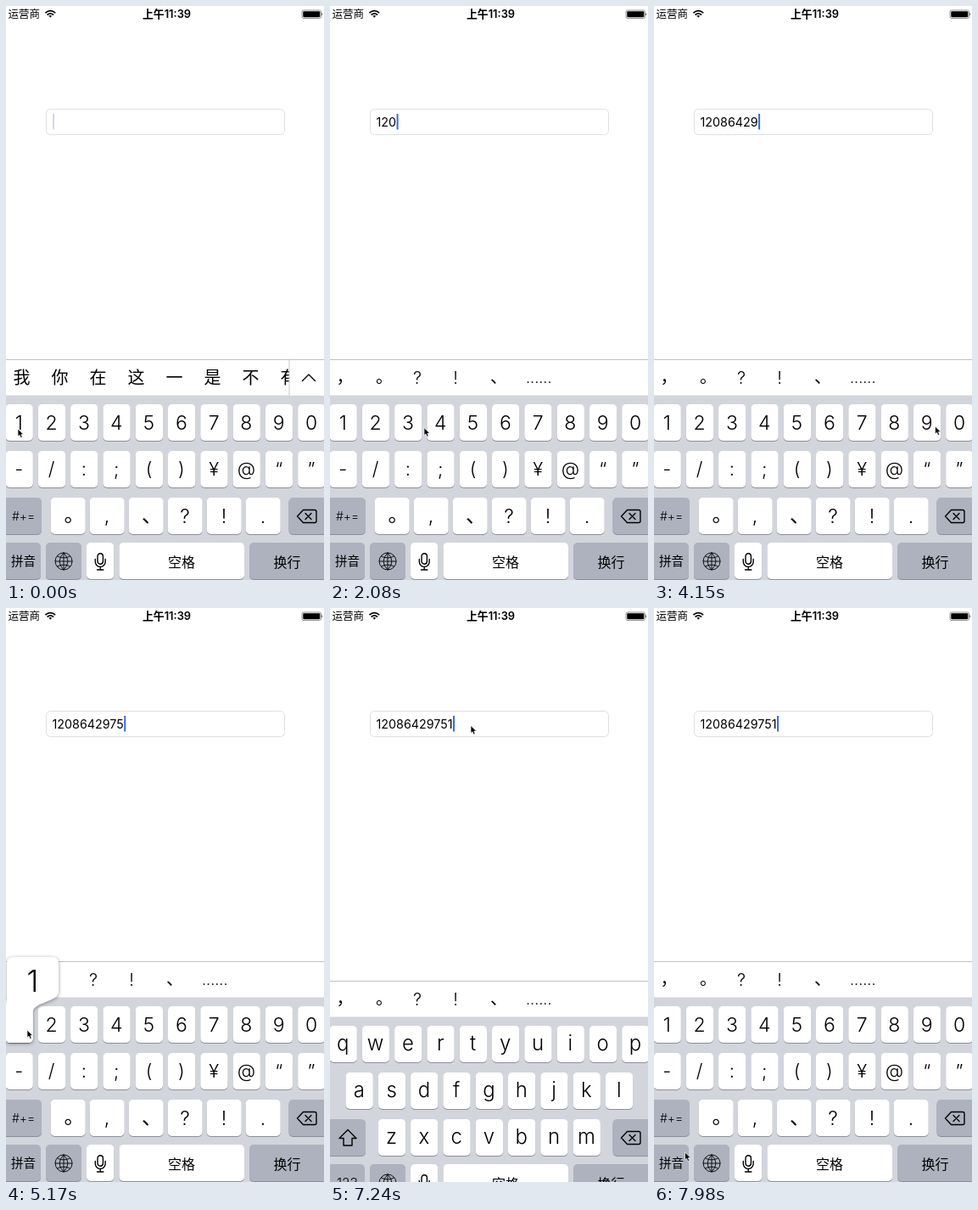
An HTML page that plays this animation: 375 px wide and 676 px high, repeating every 8 s.

```html
<!DOCTYPE html>
<html lang="zh">
<head>
<meta charset="utf-8">
<style>
html, body { margin: 0; width: 100%; height: 100%; overflow: hidden; background: #fff; }
svg { display: block; }
text { font-family: Inter, "Noto Sans CJK SC", "Noto Sans CJK", sans-serif; fill: #000; white-space: pre; }
.light { font-weight: 350; }
.line { fill: none; stroke: #000; stroke-width: 1.4; stroke-linejoin: round; stroke-linecap: round; }
.thin { stroke-width: .9; }
</style>
</head>
<body>
<svg width="375" height="676" viewBox="0 0 375 676">
  <g id="status">
    <text x="2.5" y="14" font-size="12.5">运营商</text>
    <g class="line" style="stroke-width:1.7;stroke-linecap:butt">
      <path d="M46.4 8.2Q52.3 3.2 58.2 8.2M48.6 10.5Q52.3 7.4 56 10.5"/>
      <path d="M50.4 11.6Q52.3 10.2 54.2 11.6L52.3 13.8Z" fill="#000" stroke="none"/>
    </g>
    <text x="189.5" y="14" font-size="12.9" font-weight="600" text-anchor="middle">上午11:39</text>
    <rect x="349" y="5" width="22.5" height="9.5" rx="2" fill="#fff" stroke="#777" stroke-width=".8"/>
    <rect x="350.3" y="6.2" width="20" height="7.1" rx="1"/>
    <path d="M372.5 8q1.8 1.7 0 3.6z"/>
  </g>
  <rect x="47.5" y="121.5" width="281" height="30" rx="5" fill="#fff" stroke="#dfdfe1"/>
  <text id="entry" x="54.5" y="141.6" font-size="14.3"></text>
  <rect id="caret" y="127" width="2" height="18.5"/>
  <g id="board">
    <rect y="416" width="375" height="262" fill="#d2d5dc"/>
    <rect y="416" width="375" height="42.5" fill="#fff"/>
    <rect y="416" width="375" height="1" fill="#bfc0c8"/>
    <g id="words"></g>
    <g id="marks" class="light"></g>
    <g id="common"></g>
    <g id="numbers" class="light"></g>
    <g id="letters" class="light"></g>
  </g>
  <g id="popup" style="filter:drop-shadow(0 1px 2px #0006)"><path fill="#fff"/><text class="light" y="452" font-size="35" text-anchor="middle"></text></g>
  <path id="pointer" d="M0 0V9L2 7.2 3.5 10.6 5.2 9.8 3.8 6.6H6.7Z" stroke="#fff" stroke-width=".7"/>
</svg>
<script>
const $ = id => document.getElementById(id);
const TICK = 147.7, LOOP = 8000, PITCH = 38.3;
const NUMBER = '12086429751';
const DARK = '#adb2be';

const label = (s, x, y, size, anchor = 'middle') =>
  `<text x="${x}" y="${y}" font-size="${size}" text-anchor="${anchor}">${s}</text>`;
const key = (x, y, w, fill = '#fff') =>
  `<rect x="${x}" y="${y + 1}" width="${w}" height="43" rx="5" fill="#8c8f98"/>` +
  `<rect x="${x}" y="${y}" width="${w}" height="43" rx="5" fill="${fill}"/>`;
const row = (chars, x, y, baseline, size) => [...chars].map((c, i) =>
  key(x + PITCH * i, y, 32.3) + label(c, x + 15.8 + PITCH * i, baseline, size)).join('');
const line = (d, cls = '') => `<path class="line ${cls}" d="${d}"/>`;

$('words').innerHTML = [...'我你在这一是不有'].map((c, i) => label(c, 18.5 + 45 * i, 445, 20)).join('') +
  '<rect x="334" y="417" width="41" height="41.5" fill="#fff"/><rect x="333.5" y="416" width="1" height="42.5" fill="#c9cad0"/>' +
  line('M349.5 441.5L357 434L364.5 441.5');

$('marks').innerHTML = label('，', 7.5, 444, 20, 'start') + label('。', 54, 444, 20, 'start') +
  label('?', 103, 445, 20) + label('!', 148, 445, 20) + label('、', 189, 444, 20, 'start') +
  label('......', 231, 444, 18, 'start');

$('common').innerHTML =
  key(-5, 632, 46, DARK) + key(47, 632, 42, DARK) + key(95, 632, 32.3) +
  key(133.5, 632, 147.5) + key(287, 632, 93, DARK) +
  label('空格', 207, 660.5, 16) + label('换行', 331.5, 660.5, 16) +
  // globe
  line('M58 654a10 10 0 1 0 20 0a10 10 0 1 0-20 0H78M68 644V664M68 644q-10 10 0 20q10-10 0-20M60.5 648q7.5 4 15 0M60.5 660q7.5-4 15 0', 'thin') +
  // microphone
  line('M108 648a3.2 3.2 0 0 1 6.4 0v6a3.2 3.2 0 0 1-6.4 0zM105.3 651.5v3a5.9 5.9 0 0 0 11.8 0v-3M111.2 660.5v3.5M107.5 664h7.4') +
  // delete
  key(333.5, 579, 47, DARK) +
  line('M343.5 601L350.5 593.5H364Q366 593.5 366 595.5V606.5Q366 608.5 364 608.5H350.5ZM353 597.5L360 604.5M360 597.5L353 604.5');

const punctuation = [['。', 68.5, 607, 24, 'start'], [',', 119, 608, 23], ['、', 160, 608, 24, 'start'],
  ['?', 211, 609, 23], ['!', 257, 609, 23], ['.', 303, 609, 23]];
$('numbers').innerHTML = row('1234567890', -.5, 469, 499.3, 23) + row('-/:;()¥@“”', -.5, 524, 553.3, 22) +
  key(-5, 579, 47, DARK) + label('#+=', 20.5, 606, 14) +
  punctuation.map((p, i) => key(52.7 + 46 * i, 579, 41) + label(...p)).join('') +
  label('拼音', 20.5, 658.5, 14.5);

$('letters').innerHTML = row('qwertyuiop', -.5, 469, 497.5, 24) +
  row('asdfghjkl', 18.5, 524, 552.5, 24) + row('zxcvbnm', 56.8, 579, 607.5, 24) +
  key(-5, 579, 47, DARK) +
  line('M21 591.5L31 601.5H26V610H16V601.5H11Z') + label('123', 20.5, 660, 15.5);

// All times below are in ticks.
const presses = [4, 10, 13, 16, 18, 21, 23, 26, 29, 31, 35];
const path = [[0, 14, 498], [1, 16, 498], [7, 20, 497], [8, 38, 496], [9, 57, 497], [11, 57, 497],
  [13, 98, 497], [16, 137, 496], [18, 179, 496], [19, 179, 496], [20, 219, 495], [21, 219, 495],
  [23, 258, 496], [26, 295, 495], [27, 295, 495], [28, 331.5, 495], [29, 331.5, 495], [31, 364, 497],
  [32, 300, 510], [33, 150, 519], [34, 29, 506], [35, 25, 497], [40, 25, 497], [42, 134, 342],
  [43, 134, 342], [46, 166, 138.5], [50, 166, 138.5], [52, 36.5, 641], [55, 36.5, 641]];

function pointerAt(n) {
  const i = path.findIndex(p => p[0] > n);
  const [a, b] = [path[i - 1], path[i]], k = (n - a[0]) / (b[0] - a[0]);
  return [a[1] + (b[1] - a[1]) * k, a[2] + (b[2] - a[2]) * k];
}

function boardOffset(n) {
  if (n < 37) return 0;
  if (n < 39) return 260 * (1 - Math.exp(-1.6 * (n - 36.7)));
  if (n < 47) return 270;
  return n < 52 ? 260 * Math.exp(-1.21 * (n - 47)) : 0;
}

function caretAlpha(n) {
  if (n < 4) return n ? 0 : .22;
  return n < 37 || n > 46 && n < 52 || n > 53 ? 1 : 0;
}

const release = i => presses[i] + (i === 10 ? 2 : 1);

function drawPopup(i) {
  show('popup', i >= 0);
  if (i < 0) return;
  const col = i % 10, a = -.5 + PITCH * col, b = a + 32.3;
  const l = col === 0 ? 1 : col === 9 ? 313 : a - 15, r = l + 61;
  const [shape, digit] = $('popup').children;
  shape.setAttribute('d', `M${l + 8} 411H${r - 8}Q${r} 411 ${r} 419V452C${r} 464 ${b} 464 ${b} 476V507` +
    `Q${b} 512 ${b - 5} 512H${a + 5}Q${a} 512 ${a} 507V476C${a} 464 ${l} 464 ${l} 452V419Q${l} 411 ${l + 8} 411Z`);
  digit.setAttribute('x', (l + r) / 2);
  digit.textContent = (col + 1) % 10;
}

function show(id, on) { $(id).style.display = on ? '' : 'none'; }

function draw(n) {
  const typed = presses.filter((p, i) => n >= release(i)).length;
  $('entry').textContent = NUMBER.slice(0, typed);
  $('caret').setAttribute('x', 55 + (typed ? $('entry').getComputedTextLength() : 0));
  $('caret').setAttribute('opacity', caretAlpha(n));
  $('caret').setAttribute('fill', n < 10 ? '#3a44b4' : '#3569e4');
  show('words', !typed);
  show('marks', typed);
  const alpha = n >= 40 && n < 53;
  show('letters', alpha);
  show('numbers', !alpha);
  $('board').setAttribute('transform', `translate(0 ${Math.round(boardOffset(n))})`);
  drawPopup(presses.findIndex((p, i) => n >= p && n < release(i)));
  $('pointer').setAttribute('transform', `translate(${pointerAt(n)})`);
}

let last = -1;
const start = performance.now();
function frame() {
  const n = Math.floor((performance.now() - start) % LOOP / TICK);
  if (n !== last) draw(last = n);
  requestAnimationFrame(frame);
}
frame();
</script>
</body>
</html>
```
